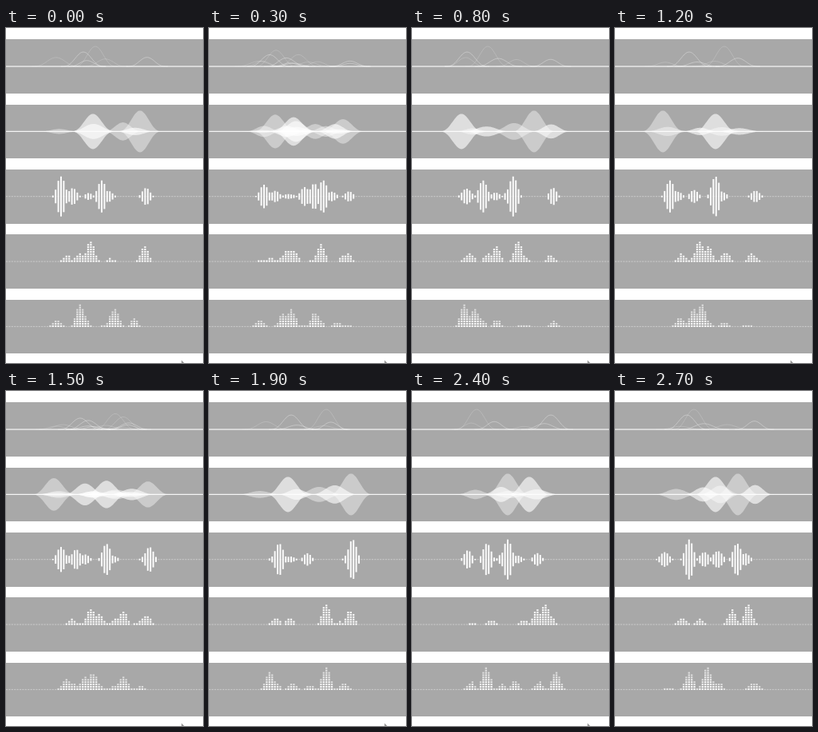
Write an HTML page with a canvas that moves like this. It is 247x419 px and loops after 2.8 s.

```html
<!DOCTYPE html>
<html lang="en">
<head>
<meta charset="utf-8">
<title>Audio visualizers</title>
<style>
  html, body { margin: 0; width: 100%; height: 100%; overflow: hidden; background: #fff; }
  canvas { display: block; }
</style>
</head>
<body>
<canvas id="stage" width="247" height="419"></canvas>
<script>
const ctx = document.getElementById('stage').getContext('2d');
const W = 247, H = 419, LOOP = 2800, STEP = 100;
const PITCH = 3.4, CELL = 2.9, ROW = 81.33, BAND = 67.7, FIRST = 48.05;
const times = [0, 500, 800, 1200, 1900, 2400, 2700, LOOP];

// Centres of the two main peaks at each key time; the rest is seeded
const rows = [
  { draw: drawLines, width: 28, heights: [25, 18],
    first: [112, 84, 95, 137, 147, 81, 99], second: [97, 76, 69, 93, 103, 174, 90] },
  { draw: drawBlobs, width: 30, heights: [26, 22],
    first: [168, 83, 153, 60, 178, 120, 154], second: [109, 106, 62, 126, 99, 147, 126] },
  { draw: drawBars, width: 14, heights: [25, 20],
    first: [69, 143, 127, 126, 180, 120, 93], second: [120, 132, 89, 69, 88, 94, 153] },
  { draw: drawStacks, width: 15, heights: [27, 19],
    first: [106, 140, 133, 106, 147, 167, 167], second: [174, 98, 106, 117, 177, 157, 147] },
  { draw: drawFading, width: 16, heights: [28, 23],
    first: [93, 103, 66, 109, 147, 93, 116], second: [136, 133, 79, 99, 76, 181, 93] }
];

function seeded(seed) {
  return () => {
    seed = (seed * 16807) % 2147483647;
    return seed / 2147483647;
  };
}

const rand = seeded(4211);
const white = a => `rgba(255,255,255,${a})`;

function makePose({ width, heights, first, second }, i) {
  const pose = [
    { x: first[i], h: heights[0], w: width, bright: false },
    { x: second[i], h: heights[1], w: width, bright: true }
  ];
  for (let k = 0; k < 4; k++) {
    pose.push({
      x: 62 + 30 * k + 25 * rand(),
      h: 3 + 9 * rand(),
      w: width * (0.85 + 0.3 * rand()),
      bright: k % 2 === 1
    });
  }
  return pose;
}

for (const row of rows) row.poses = row.first.map((_, i) => makePose(row, i));

function bell(x, { x: c, h, w }) {
  const u = (x - c) / w;
  return Math.abs(u) < 1 ? h * (1 - u * u) ** 4 : 0;
}

// Bumps sink while the next set rises at its own places
function bumpsAt(poses, t) {
  const i = times.findIndex((at, k) => t >= at && t < times[k + 1]);
  const p = (t - times[i]) / (times[i + 1] - times[i]) * Math.PI / 2;
  const scaled = (pose = [], s) => pose.map(b => ({ ...b, h: b.h * s }));
  return [...scaled(poses[i], Math.cos(p)), ...scaled(poses[i + 1], Math.sin(p))]
    .filter(b => b.h > 0.1);
}

function trace(bump, y, dir) {
  for (let k = -24; k <= 24; k++) {
    const x = bump.x + dir * bump.w * k / 24;
    ctx.lineTo(x, y - dir * bell(x, bump));
  }
}

function solidBase(y) {
  ctx.fillStyle = white(0.9);
  ctx.fillRect(0, y - 0.6, W, 1.2);
}

function columns(bumps, y, draw) {
  for (let x = 1; x < W; x += PITCH) {
    ctx.fillStyle = white(0.4);
    ctx.fillRect(x - 1.1, y - 0.5, 2.2, 1);
    const h = Math.max(...bumps.map(b => bell(x, b)));
    if (h > 0.7) draw(x, h);
  }
}

function drawLines(bumps, y) {
  ctx.lineWidth = 0.9;
  for (const b of bumps) {
    ctx.strokeStyle = white(b.bright ? 0.36 : 0.2);
    ctx.beginPath();
    trace(b, y, 1);
    ctx.stroke();
  }
  solidBase(y);
}

function drawBlobs(bumps, y) {
  for (const b of bumps) {
    ctx.fillStyle = white(b.bright ? 0.62 : 0.4);
    ctx.beginPath();
    trace(b, y, 1);
    trace(b, y, -1);
    ctx.fill();
  }
  solidBase(y);
}

function drawBars(bumps, y) {
  columns(bumps, y, (x, h) => {
    ctx.fillStyle = white(0.95);
    ctx.fillRect(x - 1, y - h, 2, h * 2);
  });
}

function drawStacks(bumps, y, fade = 0) {
  columns(bumps, y, (x, h) => {
    const n = Math.round(h / CELL);
    for (let j = 0; j < n; j++) {
      ctx.fillStyle = white(0.95 - fade * Math.max(0, (j + 1) / n - 0.45));
      ctx.fillRect(x - 1.15, y + 0.5 - j * CELL - 2, 2.3, 2);
    }
  });
}

function drawFading(bumps, y) {
  drawStacks(bumps, y, 0.6);
}

function drawPointer() {
  ctx.fillStyle = '#999';
  ctx.beginPath();
  ctx.moveTo(220, 415.5);
  ctx.lineTo(220, 419);
  ctx.lineTo(223.5, 419);
  ctx.fill();
}

function render(t) {
  ctx.fillStyle = '#fff';
  ctx.fillRect(0, 0, W, H);
  rows.forEach(({ poses, draw }, i) => {
    const y = FIRST + i * ROW;
    const top = Math.round(y - BAND / 2), bottom = Math.round(y + BAND / 2);
    ctx.fillStyle = '#a8a8a8';
    ctx.fillRect(0, top, W, bottom - top);
    draw(bumpsAt(poses, t), y);
  });
  if (t < 2600) drawPointer();
}

const start = performance.now();
function frame() {
  const t = (performance.now() - start) % LOOP;
  render(Math.floor(t / STEP) * STEP);
  requestAnimationFrame(frame);
}
frame();
</script>
</body>
</html>
```
